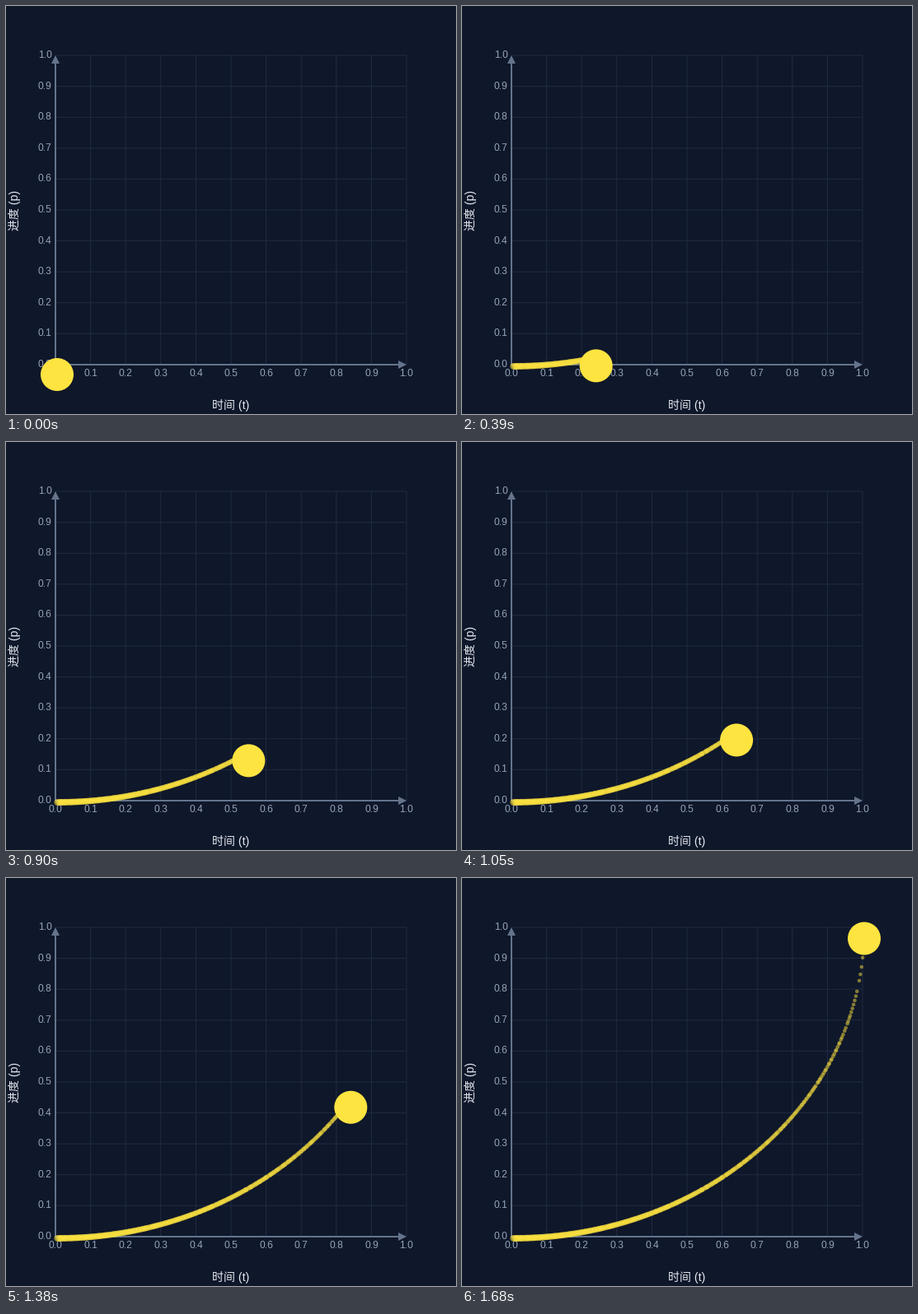
Recreate the animation shown at these times as a matplotlib script. Size 546x496 px, loop 1.71 s.

```python
import numpy as np
import matplotlib.pyplot as plt
from matplotlib.animation import FuncAnimation
from matplotlib.patches import Circle, Polygon

W, H, DPI = 546, 496, 100
FRAMES, STEP, DURATION = 57, 30, 1650
X0, Y0, XLEN, YLEN = 60, 436, 426, 376
RISE = 374.5

BG, GRID, AXIS = "#0f172a", "#202c41", "#64748b"
TICK, TITLE, YELLOW = "#94a3b8", "#e2e8f0", "#fee440"

plt.rcParams["font.family"] = ["Liberation Sans", "Noto Sans CJK JP"]


def pt(px):
    return px * 72 / DPI


def ease_in_circ(t):
    return 1 - np.sqrt(1 - t * t)


def line(xs, ys, color, width):
    ax.plot(xs, ys, color=color, lw=pt(width), snap=False,
            solid_capstyle="butt", zorder=1)


def label(x, y, text, size, color, **kw):
    kw = {"ha": "center", "va": "baseline", "rotation_mode": "anchor", **kw}
    ax.text(x, y, text, fontsize=pt(size), color=color, zorder=3, **kw)


fig = plt.figure(figsize=(W / DPI, H / DPI), dpi=DPI, facecolor=BG)
ax = fig.add_axes([0, 0, 1, 1])
ax.set_xlim(0, W)
ax.set_ylim(H, 0)
ax.axis("off")

# Grid and tick labels
for i in range(11):
    x, y = X0 + XLEN * i / 10, Y0 - YLEN * i / 10
    line([x, x], [Y0, Y0 - YLEN], GRID, 1)
    line([X0, X0 + XLEN], [y, y], GRID, 1)
    label(x, 450, f"{i / 10:.1f}", 12, TICK)
    label(55.5, y + 3, f"{i / 10:.1f}", 12, TICK, ha="right")

# Axes with arrowheads
right, top = X0 + XLEN, Y0 - YLEN
line([X0, right - 5], [Y0, Y0], AXIS, 2)
line([X0, X0], [Y0 + 1, top + 5], AXIS, 2)
for tip in ([(right, Y0), (right - 10, Y0 - 5), (right - 10, Y0 + 5)],
            [(X0, top), (X0 - 5, top + 10), (X0 + 5, top + 10)]):
    ax.add_patch(Polygon(tip, fc=AXIS, lw=0, zorder=2))

label(273, 490, "时间 (t)", 14, TITLE)
label(15, 248, "进度 (p)", 14, TITLE, rotation=90)

# Trail dots, left behind at slightly uneven moments
rng = np.random.default_rng(4)
dot_t = np.arange(0.9957, 0, -0.00325)[::-1]
dot_t[:-12] += rng.normal(0, 0.0007, len(dot_t) - 12)
dot_t = np.sort(np.clip(np.delete(dot_t, -5), 0, 1))
dots = np.column_stack([62 + XLEN * dot_t, 438 - YLEN * ease_in_circ(dot_t)])
sizes = pt(2 * (4 - 1.8 * dot_t)) ** 2

trail = ax.scatter([], [], color=YELLOW, alpha=0.5, linewidths=0, zorder=4)
ball = ax.add_patch(Circle((62, 448), 20, fc=YELLOW, lw=0, zorder=5))


def update(frame):
    t = min(frame * STEP / DURATION, 1)
    n = np.searchsorted(dot_t, t)
    trail.set_offsets(dots[:n])
    trail.set_sizes(sizes[:n])
    ball.center = (62 + XLEN * t, 448 - RISE * ease_in_circ(t))
    return trail, ball


anim = FuncAnimation(fig, update, frames=FRAMES, interval=STEP,
                     repeat=True, repeat_delay=0)
plt.show()
```
